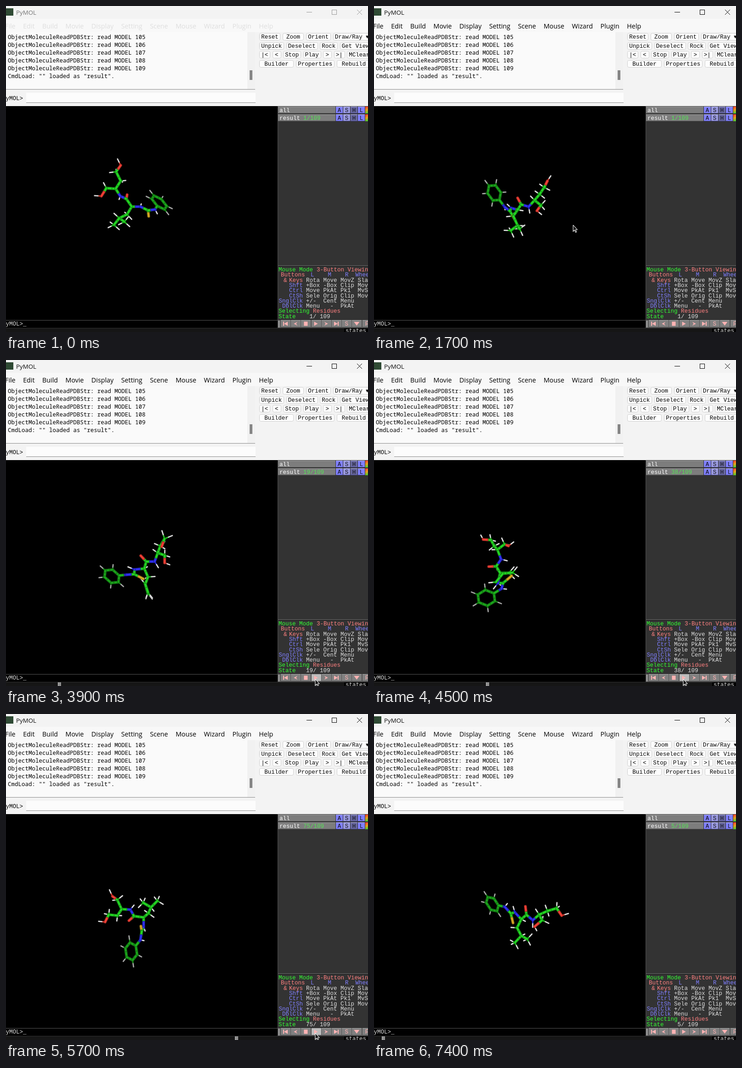
These frames come from a looping animation (789 by 710 pixels, 7.9 s). An HTML page with a canvas:

```html
<!DOCTYPE html>
<html lang="en">
<head>
<meta charset="utf-8">
<title>PyMOL</title>
<style>
html, body { margin: 0; width: 100%; height: 100%; overflow: hidden; background: #000; }
canvas { display: block; }
</style>
</head>
<body>
<canvas id="stage" width="789" height="710"></canvas>
<script>
const ctx = document.getElementById('stage').getContext('2d');
const LOOP = 7900;
const STATES = 109;
const UI = '"Open Sans", "Noto Sans", sans-serif';
const MONO = '12.5px "Liberation Mono", monospace';
const CONSOLE = '12.5px "Noto Sans Mono", monospace';
const WHITE = '#dedede', GREEN = '#33ff33', BLUE = '#7f7fff', SALMON = '#ff8080', PINK = '#ffb3b3';

// ---------- helpers ----------
function box(x, y, w, h, color) {
  ctx.fillStyle = color;
  ctx.fillRect(x, y, w, h);
}
function text(s, x, y, color, font = MONO, align = 'left') {
  ctx.font = font;
  ctx.fillStyle = color;
  ctx.textAlign = align;
  ctx.fillText(s, x, y);
}
function textWidth(s, font) {
  ctx.font = font;
  return ctx.measureText(s).width;
}
function line(points, color, width = 1) {
  ctx.strokeStyle = color;
  ctx.lineWidth = width;
  ctx.beginPath();
  points.forEach(([x, y]) => ctx.lineTo(x, y));
  ctx.stroke();
}
function polygon(points, color) {
  ctx.fillStyle = color;
  ctx.beginPath();
  points.forEach(([x, y]) => ctx.lineTo(x, y));
  ctx.closePath();
  ctx.fill();
}
const clamp = k => Math.max(0, Math.min(1, k));
const lerp = (a, b, k) => a + (b - a) * k;
const add = (a, b) => [a[0] + b[0], a[1] + b[1]];
const sub = (a, b) => [a[0] - b[0], a[1] - b[1]];
const mul = (a, s) => [a[0] * s, a[1] * s];
const dot = (a, b) => a[0] * b[0] + a[1] * b[1];
const mix = (a, b, k) => add(a, mul(sub(b, a), k));
const distance = (a, b) => Math.hypot(...sub(a, b));

// Finds the segment of [position, value] keys around a position.
function segment(keys, at) {
  let i = 0;
  while (i < keys.length - 2 && at >= keys[i + 1][0]) i++;
  const [a, b] = [keys[i], keys[i + 1]];
  return [a[1], b[1], clamp((at - a[0]) / (b[0] - a[0]))];
}

// ---------- molecule ----------
const BOND = 21;
const BONDS = ('CA-N2 N2-C7 C7-S C7-N1 CA-CB CB-CG CG-CD1 CG-CD2 CA-C C-O C-N3 N3-C10 ' +
  'C10-C11 C11-O11 C10-C12 C12-C13 C13-O13 N1-ring').split(' ').map(s => s.split('-'));
const VALENCE = { C: 4, N: 3, O: 2 };
const BARE = ['C7', 'S', 'C', 'O'];
const TONE = { C: [33, 205, 33], N: [45, 45, 235], O: [230, 60, 50], S: [205, 160, 35], H: [220, 220, 220] };
const KEYS = 'CA N2 S N1 CG CD1 O N3 C10 O11 C12 C13 O13 ring V'.split(' ');

// A bond as a unit vector seen from the front, shorter when it leans in depth.
function unit(from, to) {
  const u = mul(sub(to, from), 1 / BOND);
  return mul(u, 1 / Math.max(1, Math.hypot(...u)));
}
// The two free directions on a tetrahedral atom with bonds a and b.
function freeDirections(a, b) {
  const az = Math.sqrt(Math.max(0, 1 - dot(a, a)));
  const bz = Math.sqrt(Math.max(0, 1 - dot(b, b))) * Math.sign(-1 / 3 - dot(a, b));
  const cross = [a[1] * bz - az * b[1], az * b[0] - a[0] * bz];
  const size = Math.hypot(...cross, a[0] * b[1] - a[1] * b[0]) || 1;
  const back = mul(add(a, b), -0.5), side = mul(cross, 0.816 / size);
  return [add(back, side), sub(back, side)];
}
// The neighbour of a tetrahedral atom that lies nearer to a goal.
function branch(at, a, b, goal) {
  const [p, q] = freeDirections(unit(at, a), unit(at, b)).map(d => add(at, mul(d, BOND)));
  return distance(p, goal) < distance(q, goal) ? p : q;
}

// Key atoms are given; planar and tetrahedral geometry places the others.
function pose(...n) {
  const p = {};
  KEYS.forEach((key, i) => p[key] = [n[2 * i], n[2 * i + 1]]);
  p.C = mix(mix(p.CA, p.N3, 0.5), p.O, 0.366);
  p.C7 = mix(mix(p.N1, p.N2, 0.5), p.S, 0.285);
  p.CB = branch(p.CA, p.N2, p.C, p.CG);
  p.CD2 = branch(p.CG, p.CB, p.CD1, mix(p.N3, p.CG, 2));
  p.C11 = branch(p.C10, p.N3, p.C12, p.O11);
  return p;
}
const start = pose(274,437, 293,437, 311,458, 325,443, 247,462, 258,470, 264,411, 249,414,
  239,398, 208,414, 250,381, 240,361, 250,347, 334,428, 16,13);
const turned = pose(313,444, 299,440, 308,467, 285,438, 313,478, 298,489, 313,418, 337,437,
  350,423, 355,446, 361,410, 371,395, 378,381, 262,407, 10,-10);
const early = pose(321,447, 307,432, 303,455, 285,420, 321,483, 307,498, 330,419, 346,449,
  360,437, 350,463, 378,429, 398,423, 409,439, 258,414, -4,-16);
const folded = pose(275,464, 270,486, 300,470, 278,498, 281,465, 302,463, 250,450, 277,434,
  269,413, 293,405, 262,405, 255,392, 238,391, 245,518, -12,-14);
const hanging = pose(300,443, 300,464, 294,462, 293,492, 316,421, 299,411, 268,450, 271,426,
  252,425, 232,397, 243,439, 224,437, 216,453, 273,517, -9,-15);
const upright = pose(268,485, 247,476, 225,454, 261,447, 265,514, 272,500, 263,468, 291,479,
  300,465, 326,470, 308,449, 311,432, 313,417, 265,407, 21,4);
const POSES = [[1, turned], [5, early], [38, folded], [75, hanging], [94, upright],
  [STATES + 1, turned], [STATES + 5, early]];

// Turns and scales one bond into another the short way round.
function mixBond(a, b, k) {
  const from = Math.atan2(a[1], a[0]);
  let turn = Math.atan2(b[1], b[0]) - from;
  turn -= 2 * Math.PI * Math.round(turn / (2 * Math.PI));
  const size = lerp(Math.hypot(...a), Math.hypot(...b), k), angle = from + turn * k;
  return [size * Math.cos(angle), size * Math.sin(angle)];
}
function mixPose(a, b, k) {
  const out = { CA: mix(a.CA, b.CA, k), V: mixBond(a.V, b.V, k) };
  for (const [from, to] of BONDS) {
    out[to] = add(out[from], mixBond(sub(a[to], a[from]), sub(b[to], b[from]), k));
  }
  return out;
}
// Rotation about the vertical axis of the view.
function spinPose(a, b, k) {
  const angle = 2.4, weight = part => Math.sin(angle * part) / Math.sin(angle);
  const out = {};
  for (const key in a) {
    const mid = key === 'V' ? 0 : 296;
    const x = mid + (a[key][0] - mid) * weight(1 - k) + (b[key][0] - mid) * weight(k);
    out[key] = [x, lerp(a[key][1], b[key][1], k)];
  }
  return out;
}

function stroke(a, b, tone, width, light) {
  const shade = f => `rgb(${tone.map(v => Math.min(255, Math.round(v * f * light)))})`;
  line([a, b], shade(0.72), width);
  line([a, b], shade(1.08), width * 0.5);
}
function stick(a, b, nameA, nameB, light = 1) {
  const middle = mix(a, b, 0.5), width = nameB === 'H' ? 3.1 : 6.2;
  ctx.lineCap = 'round';
  stroke(a, middle, TONE[nameA[0]], width, light);
  stroke(middle, b, TONE[nameB[0]], width, light);
  ctx.lineCap = 'butt';
}

function drawRing(p) {
  const axis = mul(sub(p.N1, p.ring), 0.495);
  const corner = (k, scale = 1) => {
    const angle = k * Math.PI / 3;
    const offset = add(mul(axis, Math.cos(angle)), mul(p.V, Math.sin(angle)));
    return add(p.ring, mul(offset, scale));
  };
  for (let k = 1; k < 6; k++) stick(corner(k), corner(k, 1.76), 'C', 'H', 0.75);
  for (let k = 0; k < 6; k++) stick(corner(k), corner(k + 1), 'C', 'C', 0.76);
  stick(p.N1, corner(0), 'N', 'C', 0.85);
}

function drawMolecule(p) {
  drawRing(p);
  const directions = {};
  for (const name of ['CA', ...BONDS.map(bond => bond[1])]) {
    if (name === 'ring') continue;
    const near = BONDS.filter(bond => bond.includes(name)).map(([a, b]) => a === name ? b : a);
    const dirs = near.map(other => unit(p[name], p[other]));
    const count = BARE.includes(name) ? 0 : VALENCE[name[0]] - near.length;
    let free = [];
    if (near.length === 1) {
      const root = directions[near[0]];
      free = root.dirs.filter((_, i) => root.near[i] !== name).map(d => mul(d, -1)).slice(0, count);
    } else if (count === 2) {
      free = freeDirections(...dirs);
    } else if (count === 1) {
      free = [unit([0, 0], mul(dirs.reduce(add), -BOND))];
    }
    directions[name] = { near, dirs: dirs.concat(free) };
    free.forEach(d => stick(p[name], add(p[name], mul(d, 15.5)), name, 'H'));
  }
  BONDS.forEach(([a, b]) => b !== 'ring' && stick(p[a], p[b], a, b));
}

// ---------- window ----------
const MENUS = 'File Edit Build Movie Display Setting Scene Mouse Wizard Plugin Help'.split(' ');
const BUTTON_ROWS = [
  { least: 46, labels: ['Reset', 'Zoom', 'Orient', 'Draw/Ray ▾'] },
  { least: 0, labels: ['Unpick', 'Deselect', 'Rock', 'Get View'] },
  { least: 18.5, labels: ['|<', '<', 'Stop', 'Play', '>', '>|', 'MClear'] },
  { least: 75, labels: ['Builder', 'Properties', 'Rebuild'] }
];

function drawMenus(color) {
  const font = '14.3px ' + UI;
  let x = -2;
  for (const s of MENUS) {
    text(s, x, 49, color, font);
    x += textWidth(s, font) + 16.5;
  }
}
function drawButtons() {
  BUTTON_ROWS.forEach(({ least, labels }, row) => {
    const y = Math.round(59 + 19.7 * row);
    let x = 552;
    for (const s of labels) {
      const w = Math.max(least, textWidth(s, MONO) + 8.5);
      ctx.beginPath();
      ctx.roundRect(Math.round(x) + 0.5, y + 0.5, Math.round(w) - 1, 15, 3);
      ctx.fillStyle = '#fdfdfd';
      ctx.fill();
      ctx.strokeStyle = '#cfcfcf';
      ctx.lineWidth = 1;
      ctx.stroke();
      text(s, x + w / 2, y + 12, '#000', MONO, 'center');
      x += w + 5;
    }
  });
}

function drawWindow(active) {
  box(0, 0, 789, 218, '#f3f3f3');
  box(0, 28, 789, 29, '#f8f8f8');
  const ink = active ? '#000' : '#999';
  box(0, 5, 16, 16, '#2f4a34');
  text('PyMOL', 22, 19, active ? '#111' : '#777', '13.3px ' + UI);
  line([[655, 13.5], [667, 13.5]], ink);
  ctx.strokeRect(710.5, 8.5, 10, 10);
  line([[765, 8], [776, 19]], ink);
  line([[776, 8], [765, 19]], ink);
  drawMenus(active ? '#000' : '#dedede');

  box(0, 57, 543, 124, '#fafafa');
  box(526, 57, 17, 124, '#f1f1f1');
  box(531, 140, 6, 21, '#858585');
  for (let i = 0; i < 5; i++) {
    text('ObjectMoleculeReadPDBStr: read MODEL ' + (STATES - 4 + i), 4, 72 + 17 * i, '#000', CONSOLE);
  }
  text('CmdLoad: "" loaded as "result".', 4, 157, '#000', CONSOLE);
  box(0, 181, 543, 1, '#8a8a8a');
  text('PyMOL>', -8, 205, '#000');
  box(44, 189, 500, 22, '#fcfcfc');
  box(44, 210, 500, 1, '#8c8c8c');
  drawButtons();
}

function drawObjectRow(y, name, counter) {
  box(593, y, 125, 15, '#7d7d7d');
  box(593, y, 125, 1, '#a6a6a6');
  box(593, y + 14, 125, 1, '#595959');
  text(name, 596, y + 12, '#fff');
  text(counter, 648, y + 12, '#55e655');
  [['A', '#8080ff'], ['S', '#9a9ae0'], ['H', '#67679e'], ['L', '#8080ff']].forEach(([s, color], i) => {
    const x = 719 + 16 * i;
    box(x, y, 15, 15, color);
    box(x, y, 15, 1, '#c0c0ff');
    box(x, y + 14, 15, 1, '#44448c');
    text(s, x + 7.5, y + 12, '#101018', MONO, 'center');
  });
  const rainbow = ctx.createLinearGradient(783, y, 789, y + 15);
  ['#ff3030', '#e0a020', '#30d030'].forEach((color, i) => rainbow.addColorStop(i / 2, color));
  box(783, y, 6, 15, rainbow);
}

const MODES = [['Shft', '+Box -Box Clip MovS'], ['Ctrl', 'Move PkAt Pk1  MvSZ'], ['CtSh', 'Sele Orig Clip MovZ'],
  ['SnglClk', '+/-  Cent Menu'], ['DblClk', 'Menu   -  PkAt']];

function drawMouseMode(state) {
  const row = i => 578 + 11.3 * i;
  box(593, 565, 196, 1, '#777');
  box(593, 566, 196, 1, '#111');
  text('Mouse Mode', 594, row(0), GREEN);
  text('3-Button Viewing', 677, row(0), SALMON);
  text('Buttons', 599, row(1), SALMON);
  text('L    M    R  Wheel', 664, row(1), BLUE);
  text('&', 605, row(2), SALMON);
  text('Keys', 647, row(2), SALMON, MONO, 'right');
  text('Rota Move MovZ Slab', 654, row(2), WHITE);
  MODES.forEach(([key, actions], i) => {
    text(key, 647, row(i + 3), BLUE, MONO, 'right');
    text(actions, 654, row(i + 3), WHITE);
  });
  text('Selecting', 594, row(8), GREEN);
  text('Residues', 669, row(8), SALMON);
  text('State', 594, row(9), GREEN);
  text(`${String(state).padStart(5)}/ ${STATES}`, 631.5, row(9), WHITE);
}

function drawControls(pressed) {
  box(593, 684, 196, 17, '#555');
  box(593, 685, 4, 15, '#909090');
  const bar = (x, w = 2) => box(x, 687.5, w, 9, PINK);
  const arrow = (x, d) => polygon([[x - 4 * d, 687.5], [x + 4 * d, 692], [x - 4 * d, 696.5]], PINK);
  const chevron = (x, d) => polygon([[x - 4 * d, 688], [x + 4 * d, 692], [x - 4 * d, 696], [x - d, 692]], PINK);
  const letter = s => x => text(s, x, 696, PINK, MONO, 'center');
  const glyphs = [
    x => { bar(x - 5); arrow(x + 1, -1); },
    x => chevron(x, -1),
    x => bar(x - 4, 8),
    x => arrow(x, 1),
    x => chevron(x, 1),
    x => { arrow(x - 1, 1); bar(x + 3); },
    letter('S'),
    x => polygon([[x - 6, 688], [x + 6, 688], [x, 696]], PINK),
    letter('F')
  ];
  glyphs.forEach((glyph, i) => {
    const x = 609 + 22.2 * i, left = Math.round(x - 10);
    box(left, 684, 21, 16, pressed && i === 3 ? '#bcbcbc' : '#808080');
    box(left, 684, 21, 1, '#ababab');
    box(left, 699, 21, 1, '#4a4a4a');
    glyph(x);
  });
}

function drawViewer(state, pressed) {
  box(0, 218, 789, 492, '#000');
  box(593, 218, 196, 466, '#333');
  box(592, 218, 1, 483, '#555');
  drawObjectRow(219, 'all', '');
  drawObjectRow(236, 'result', `${state}/${STATES}`);
  drawMouseMode(state);
  box(0, 684, 592, 1, '#555');
  text('PyMOL>_', -8, 696, WHITE);
  drawControls(pressed);
  box(0, 701, 737, 9, '#161616');
  box(0, 701, 789, 1, '#303030');
  text('states', 740, 711, WHITE);
  const x = Math.round(17 + (state - 5) * 6.89);
  box(x, 702, 7, 8, '#8f8f8f');
  box(x, 702, 1, 8, '#bdbdbd');
}

// ---------- timing ----------
const PLAY = 3300, STOP = 7000, LEAVE = 7300;
const CURSOR = [[500, [245, 425]], [1500, [421, 447]], [1700, [434, 477]], [2400, [669, 694]], [2700, [674, 695]]];

function drawCursor(t) {
  if (t < CURSOR[0][0] || t > LEAVE) return;
  const tip = t < LEAVE ? mix(...segment(CURSOR, t)) : [721, 608];
  const shape = [[0, 0], [0, 14], [3, 11], [5.5, 16], [7.5, 15], [5.2, 10.3], [9, 10]].map(p => add(p, tip));
  polygon(shape, '#101010');
  line([...shape, shape[0]], '#fff', 1.1);
}

function draw(now) {
  const t = Math.floor((now % LOOP) / 100) * 100;
  const step = t <= PLAY ? 1 : Math.min(STATES + 5, Math.round((t - PLAY) * 0.0315 - 0.15));
  drawViewer((step - 1) % STATES + 1, t >= PLAY && t < STOP);
  drawMolecule(t < 1600 ? spinPose(start, turned, clamp((t - 200) / 1300)) : mixPose(...segment(POSES, step)));
  drawWindow(t >= 300);
  drawCursor(t);
}

let begin;
function tick(now) {
  begin ??= now;
  draw(now - begin);
  requestAnimationFrame(tick);
}
draw(0);
requestAnimationFrame(tick);
</script>
</body>
</html>
```
